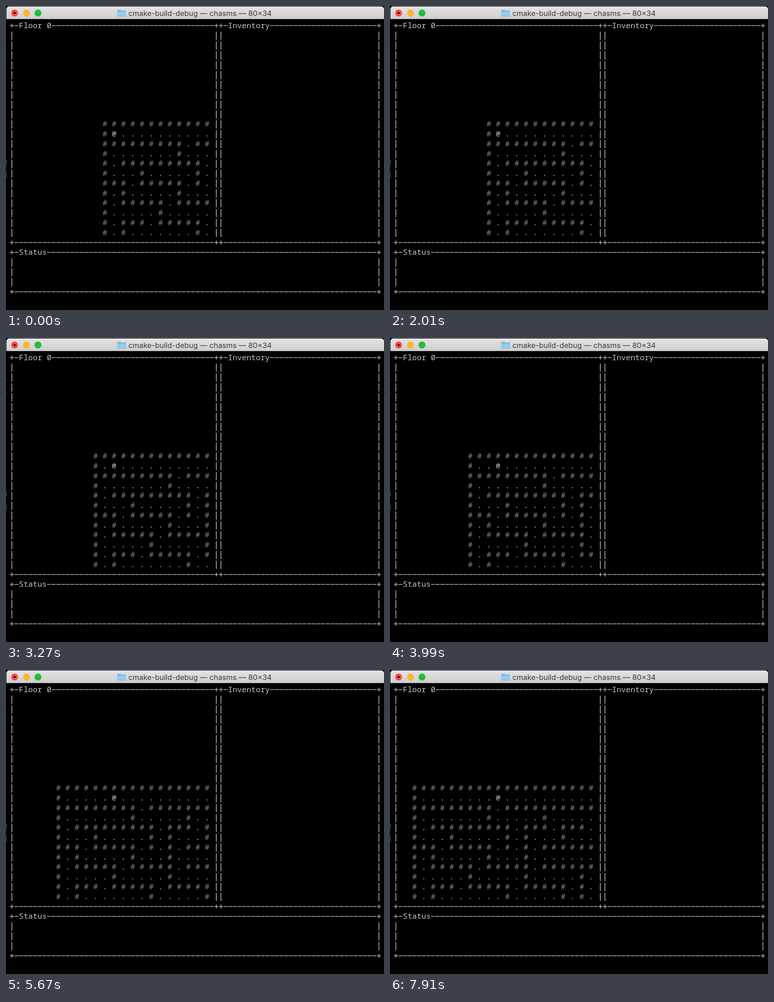
An HTML page with a canvas for the animation above (8000 ms loop, 834 by 671 pixels).

```html
<!DOCTYPE html>
<html lang="en">
<head>
<meta charset="utf-8">
<title>Maze in a terminal</title>
<style>
  html, body { margin: 0; width: 100%; height: 100%; overflow: hidden; background: #000; }
  canvas { display: block; }
</style>
</head>
<body>
<canvas width="834" height="671"></canvas>
<script>
const ctx = document.querySelector('canvas').getContext('2d');
const LOOP = 8000;
const STEP_TIMES = [2490, 3530, 4390, 4950, 5450, 5790, 6150, 6600];
const MAZE = [
  '####################',
  '#...................',
  '#########.##########',
  '#.......#.....#.....',
  '#.#########.###.###.',
  '#...#.....#.#...#...',
  '###.#####.#.#.######',
  '#.#.....#...#.......',
  '#.#####.#####.######',
  '#.....#.....#.....#.',
  '#.###.#####.#####.#.',
  '#.#.......#.....#.#.'
];
const PLAYER_COL = 22, LAST_COL = 42, MAZE_ROW = 10;
const FRAME_COLOR = '#b9b9b4', TEXT_COLOR = '#c6c6c0', MAZE_COLOR = '#85857a';
const MONO = '"Noto Sans Mono", monospace';

const cellX = col => 13 + col * 10.25;
const cellY = row => 43.3 + row * 21.76;

function rect(x, y, w, h, color) {
  ctx.fillStyle = color;
  ctx.fillRect(x, y, w, h);
}

function disc(x, y, r, color) {
  ctx.fillStyle = color;
  ctx.beginPath();
  ctx.arc(x, y, r, 0, 2 * Math.PI);
  ctx.fill();
}

function glyph(char, col, row, color, size = 17, rise = 0) {
  ctx.font = `${size}px ${MONO}`;
  ctx.fillStyle = color;
  ctx.fillText(char, cellX(col), cellY(row) + 5.4 - rise);
}

function plus(col, row) {
  const x = cellX(col), y = cellY(row);
  rect(x - 4.3, y - 0.7, 8.6, 1.5, FRAME_COLOR);
  rect(x - 0.7, y - 4.3, 1.5, 8.6, FRAME_COLOR);
}

function panel(title, left, top, right, bottom) {
  for (const row of [top, bottom]) {
    plus(left, row);
    plus(right, row);
    for (let col = left + 1; col < right; col++) {
      const letter = row === top && title[col - left - 2];
      if (letter) glyph(letter, col, row, TEXT_COLOR);
      else rect(cellX(col) - 4.5, cellY(row) - 0.7, 9, 1.5, FRAME_COLOR);
    }
  }
  for (let row = top + 1; row < bottom; row++) {
    for (const col of [left, right]) {
      rect(cellX(col) - 0.8, cellY(row) - 8.5, 1.6, 18, FRAME_COLOR);
    }
  }
}

function titleBar() {
  const shade = ctx.createLinearGradient(0, 1, 0, 29);
  shade.addColorStop(0, '#e6e4e6');
  shade.addColorStop(1, '#cecdce');
  ctx.fillStyle = shade;
  ctx.beginPath();
  ctx.roundRect(1, 1, 833, 28, [6, 6, 0, 0]);
  ctx.fill();
  rect(1, 28, 833, 1, '#b0afb0');

  disc(19, 15.5, 7.7, '#fc4a48');
  disc(19, 15.5, 2.5, '#4c0505');
  disc(45, 15.5, 7.7, '#fdb52b');
  disc(70.5, 15.5, 7.7, '#1fc136');

  rect(245.5, 8.5, 8, 4, '#71b8dc');
  rect(245.5, 10, 19.5, 13.5, '#71b8dc');
  rect(245.5, 12, 19.5, 11, '#8fcdec');

  ctx.font = '16.4px Inter, sans-serif';
  ctx.textAlign = 'left';
  ctx.fillStyle = '#3d3c3d';
  ctx.fillText('cmake-build-debug — chasms — 80×34', 270, 21.5);
}

function maze(steps) {
  const left = PLAYER_COL - 2 * (steps + 1);
  MAZE.forEach((line, i) => {
    const row = MAZE_ROW + i;
    for (let j = 0, col = left; col <= LAST_COL; j++, col += 2) {
      if (i === 1 && col === PLAYER_COL) glyph('@', col, row, '#deded8', 15, 1.4);
      else if (line[j] === '#') glyph('#', col, row, MAZE_COLOR);
      else disc(cellX(col), cellY(row) + 4.3, 1.4, MAZE_COLOR);
    }
  });
}

function draw(time) {
  rect(0, 0, 834, 671, '#000');
  titleBar();

  // Slivers of the desktop behind the window
  for (const y of [92, 120]) rect(0, y, 1, 2, '#555');
  for (const y of [340, 368]) rect(0, y, 1.5, 10, '#245c34');

  ctx.textAlign = 'center';
  panel('Floor 0', 0, 0, 44, 22);
  panel('Inventory', 45, 0, 79, 22);
  panel('Status', 0, 23, 79, 27);
  maze(STEP_TIMES.filter(t => t <= time).length);
}

function tick() {
  draw(performance.now() % LOOP);
  requestAnimationFrame(tick);
}
tick();
</script>
</body>
</html>
```
